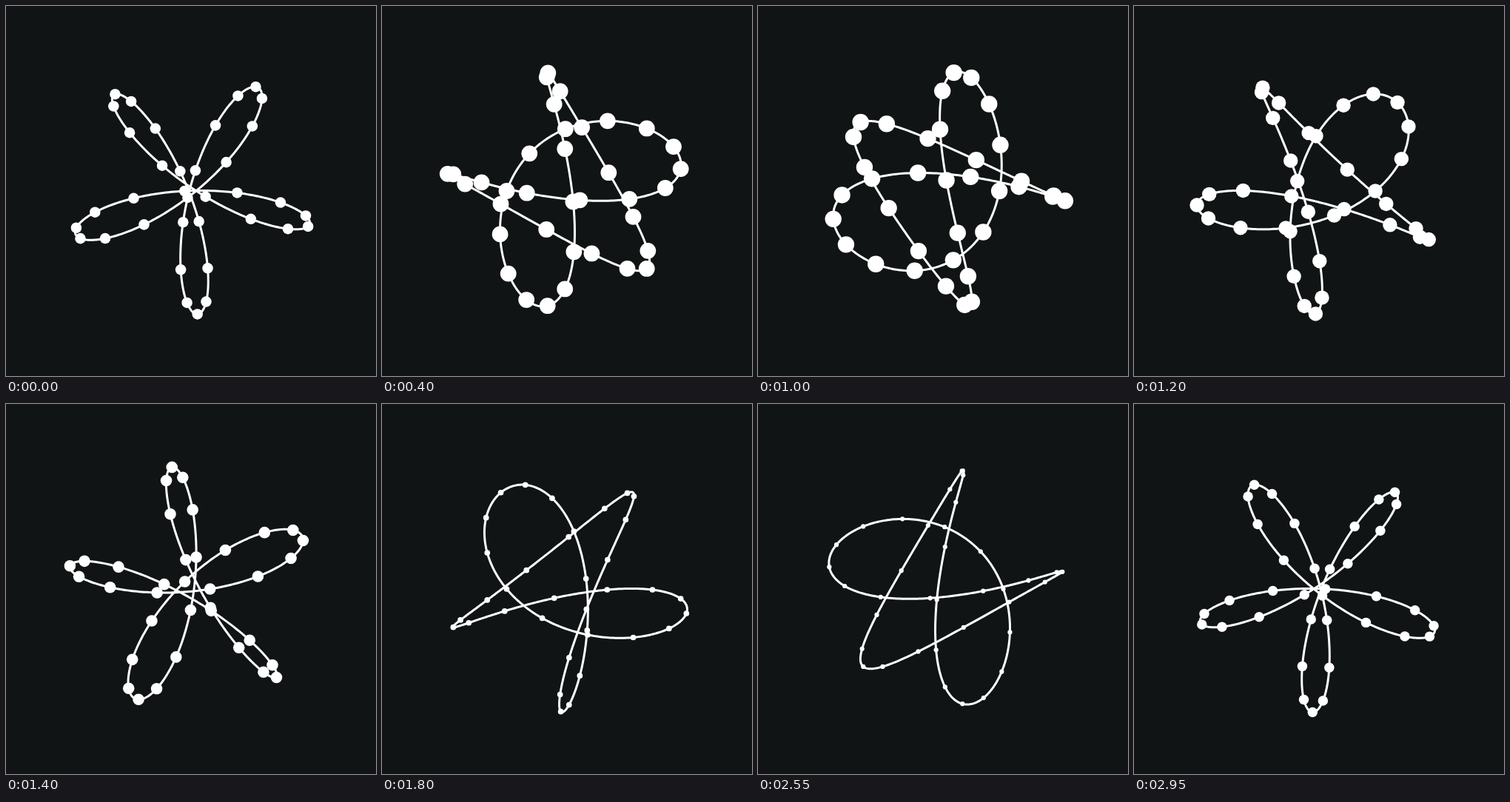
These frames come from a looping animation (500 px wide and 500 px high, 3000 ms). An HTML page with a canvas:

```html
<!DOCTYPE html>
<html lang="en">
<head>
<meta charset="utf-8">
<title>Turning curve</title>
<style>
  html, body { margin: 0; width: 100%; height: 100%; overflow: hidden; background: #101414; }
  canvas { display: block; width: 500px; height: 500px; }
</style>
</head>
<body>
<canvas id="stage" width="500" height="500"></canvas>
<script>
  const ctx = document.getElementById('stage').getContext('2d');
  const { sin, cos, PI } = Math;
  const CENTER = 250, AMP = 500 / 6;
  const LOOP = 3000, STEP = 50;
  const DOTS = 36, FINE = 720;

  // Two harmonics per axis, with the phase drifting once per loop
  const point = (t, phase) => [
    CENTER + AMP * (cos(3 * t - 2 * phase) - sin(2 * t)),
    CENTER + AMP * (sin(3 * t - phase) - cos(2 * t + phase))
  ];

  function draw(ms) {
    const step = Math.floor((ms % LOOP) / STEP);
    const phase = 2 * PI * (step + 0.5) * STEP / LOOP;
    const radius = 7 + 5 * sin(phase);

    ctx.fillStyle = '#101414';
    ctx.fillRect(0, 0, 500, 500);
    ctx.strokeStyle = ctx.fillStyle = '#fff';
    ctx.lineWidth = 3;
    ctx.lineJoin = 'round';

    ctx.beginPath();
    for (let i = 0; i < FINE; i++) ctx.lineTo(...point(2 * PI * i / FINE, phase));
    ctx.closePath();
    ctx.stroke();

    for (let i = 0; i < DOTS; i++) {
      ctx.beginPath();
      ctx.arc(...point(2 * PI * i / DOTS, phase), radius, 0, 2 * PI);
      ctx.fill();
    }
  }

  function tick() {
    draw(performance.now() - start);
    requestAnimationFrame(tick);
  }

  const start = performance.now();
  tick();
</script>
</body>
</html>
```
